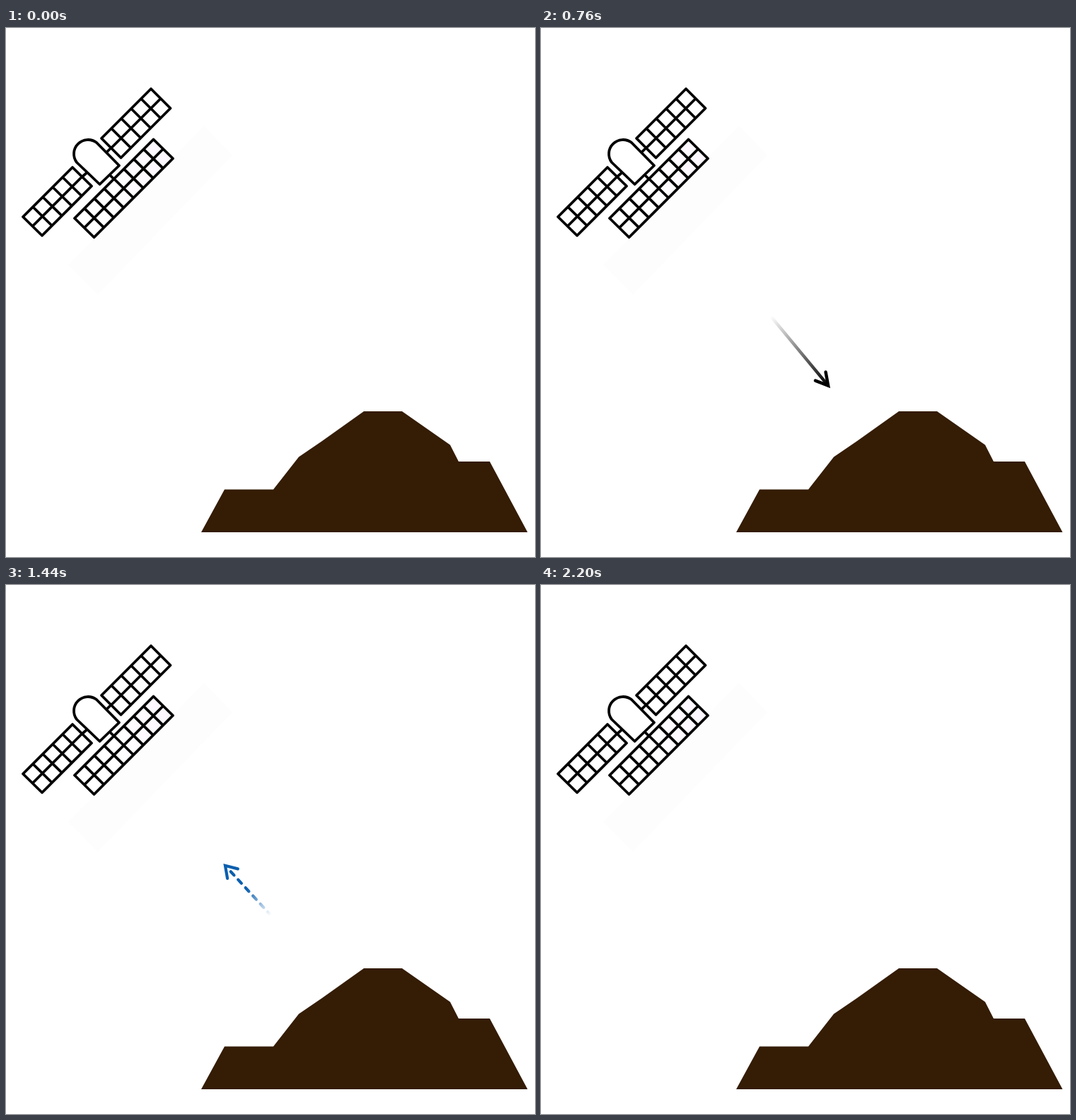
An HTML page that plays this animation: 748x748 px, repeating every 2240 ms.

```html
<!DOCTYPE html>
<html lang="en">
<head>
<meta charset="utf-8">
<title>Satellite signal</title>
<style>
  html, body { margin: 0; width: 100%; height: 100%; overflow: hidden; background: #fff; }
  svg { display: block; width: 100vw; height: 100vh; }
</style>
</head>
<body>
<svg viewBox="0 0 748 748">
  <defs>
    <linearGradient id="blackFade" gradientUnits="userSpaceOnUse" x1="-66" y1="0" x2="60" y2="0">
      <stop offset="0" stop-color="#000" stop-opacity="0"/>
      <stop offset="1" stop-color="#000"/>
    </linearGradient>
    <linearGradient id="blueFade" gradientUnits="userSpaceOnUse" x1="-50" y1="0" x2="50" y2="0">
      <stop offset="0" stop-color="#0b5fae" stop-opacity="0"/>
      <stop offset=".1" stop-color="#0b5fae" stop-opacity=".17"/>
      <stop offset=".5" stop-color="#0b5fae"/>
    </linearGradient>
    <linearGradient id="panelTint">
      <stop offset=".4" stop-color="#fff"/>
      <stop offset="1" stop-color="#fcf5ff"/>
    </linearGradient>
  </defs>

  <g id="request" fill="none" stroke-width="4.5" stroke-linecap="round">
    <path d="M-66 0H60" stroke="url(#blackFade)"/>
    <path d="M44 -9.5L61 0L44 9.5" stroke="#000"/>
  </g>
  <g id="reply" fill="none" stroke-width="4.2" stroke-linecap="round">
    <path d="M34 0H-50" stroke="url(#blueFade)" stroke-dasharray="7 8.5"/>
    <path d="M30 -10L45.5 0L30 10" stroke="#0b5fae"/>
  </g>

  <path d="M276 713L309 652.5H378L414 606.5L447 584L506 542H560L628 589.5L640 613H684L737.500 713Z" fill="#341c05"/>
  <path d="M280 138L320 180L130 377L88 335Z" fill="#fdfdfe"/>
  <g id="satellite" fill="none" stroke="#000" stroke-width="3.8" stroke-linejoin="round">
    <path d="M141 177L149 169M115 204L107 211M146 207L153 214"/>
    <path d="M160 194.500L132.500 221L100 190A20 20 0 0 1 128 162Z" fill="#fff"/>
  </g>
</svg>
<script>
  const LOOP = 2240, STEP = 40;
  const byId = id => document.getElementById(id);
  const clamp = v => Math.max(0, Math.min(1, v));

  // Grid of square cells: corner, long side and short side as vectors.
  function addPanel(x, y, [ux, uy], [vx, vy], columns, fill) {
    let d = `M${x} ${y}l${ux} ${uy}l${vx} ${vy}l${-ux} ${-uy}Z`;
    for (let i = 1; i < columns; i++) {
      const k = i / columns;
      d += `M${x + ux * k} ${y + uy * k}l${vx} ${vy}`;
    }
    d += `M${x + vx / 2} ${y + vy / 2}l${ux} ${uy}`;
    const path = document.createElementNS('http://www.w3.org/2000/svg', 'path');
    path.setAttribute('d', d);
    path.setAttribute('fill', fill);
    byId('satellite').append(path);
  }
  addPanel(135, 156, [70, -70], [27.5, 27.5], 5, '#fff');
  addPanel(24, 267, [70, -70], [27, 26.5], 5, '#fff');
  addPanel(97, 269, [111.5, -111.5], [27.5, 27], 8, 'url(#panelTint)');

  function place(id, x, y, angle, scale) {
    const arrow = byId(id);
    arrow.setAttribute('visibility', scale > 0 ? 'visible' : 'hidden');
    arrow.setAttribute('transform', `translate(${x} ${y}) rotate(${angle}) scale(${scale})`);
  }

  function draw(t) {
    const requestScale = Math.min(clamp(t / 500), clamp((1200 - t) / 200));
    place('request', 175.3 + 0.2525 * t, 238.3 + 0.29 * t, 50.4, requestScale);

    const s = t - 960;
    const replyScale = s < 0 ? 0 : clamp((1900 - t) / 240);
    place('reply', 506.8 - 0.346 * s, 621.8 - 0.399 * s, 227.5, replyScale);
  }

  const start = performance.now();
  function tick() {
    const t = (performance.now() - start) % LOOP;
    draw(Math.floor(t / STEP) * STEP);
    requestAnimationFrame(tick);
  }
  draw(0);
  requestAnimationFrame(tick);
</script>
</body>
</html>
```
